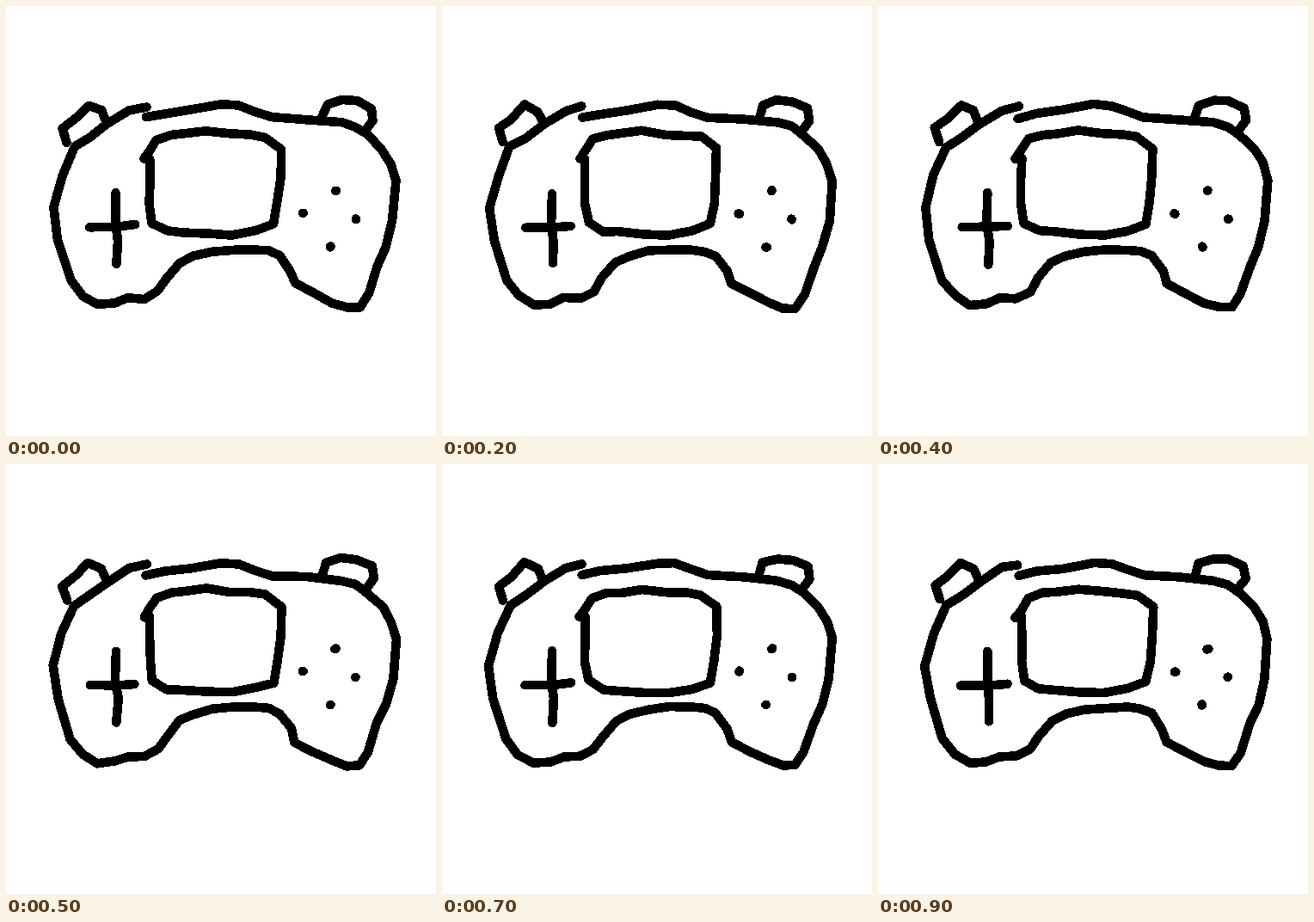
An HTML page that plays this animation: 500 by 500 pixels, repeating every 1 s.

```html
<!DOCTYPE html>
<html lang="en">
<head>
<meta charset="utf-8">
<title>Wobbly game controller</title>
<style>
html, body { margin: 0; width: 100%; height: 100%; overflow: hidden; background: #fff; }
svg { display: block; width: 100%; height: 100%; }
polyline {
  fill: none; stroke: #000; stroke-width: 10.6;
  stroke-linecap: round; stroke-linejoin: round; shape-rendering: crispEdges;
}
</style>
</head>
<body>
<svg viewBox="0 0 500 500">
  <!-- body -->
  <polyline points="163,117 144,121 118,137 97,153 79,164 65,197 55,235 60,272 75,320 89,337 107,348
    126,346 142,340 161,340 177,332 186,317 202,298 218,291 240,285 265,283 290,283 305,285 318,290
    331,308 336,323 357,334 380,345 397,351 411,351 421,335 432,302 442,280 450,250 453,203 448,183
    438,167 420,150 406,140 390,135 350,132 309,130 290,123 271,116 250,115 215,121 185,125 163,130"/>
  <!-- shoulder buttons -->
  <polyline points="71,158 66,142 81,131 96,115 111,122 117,136"/>
  <polyline points="368,130 373,115 390,110 408,111 425,119 427,133 419,145"/>
  <!-- screen -->
  <polyline points="160,178 166,170 175,155 192,150 209,149 232,145 260,149 285,150 301,152 320,166
    319,200 316,230 312,254 290,261 263,266 235,265 205,263 187,262 170,252 167,230 167,205 167,178"/>
  <!-- d-pad -->
  <polyline points="128,218 127,253 130,273 128,300"/>
  <polyline points="97,258 130,257 150,255"/>
  <!-- round buttons -->
  <polyline points="383,215 384,215"/>
  <polyline points="345,241 346,241"/>
  <polyline points="407,248 407,248"/>
  <polyline points="377,280 377,280"/>
</svg>
<script>
const STEP = 100, POSES = 10;
const lines = [...document.querySelectorAll('polyline')].map(el => ({
  el, coords: el.getAttribute('points').match(/\d+/g).map(Number)
}));

function seeded(seed) {
  return () => {
    seed = (seed + 0x6D2B79F5) | 0;
    let t = Math.imul(seed ^ (seed >>> 15), 1 | seed);
    t = (t + Math.imul(t ^ (t >>> 7), 61 | t)) ^ t;
    return ((t ^ (t >>> 14)) >>> 0) / 4294967296;
  };
}

// Each pose nudges every point by up to about one pixel.
function draw(pose) {
  const random = seeded(pose * 977 + 5);
  for (const { el, coords } of lines) {
    const amount = coords.length > 4 ? 2.2 : 1.4;
    el.setAttribute('points', coords.map(c => (c + (random() - 0.5) * amount).toFixed(1)).join(' '));
  }
}

const start = performance.now();
let shown = -1;
function tick() {
  const pose = Math.floor((performance.now() - start) / STEP) % POSES;
  if (pose !== shown) draw(shown = pose);
  requestAnimationFrame(tick);
}
tick();
</script>
</body>
</html>
```
